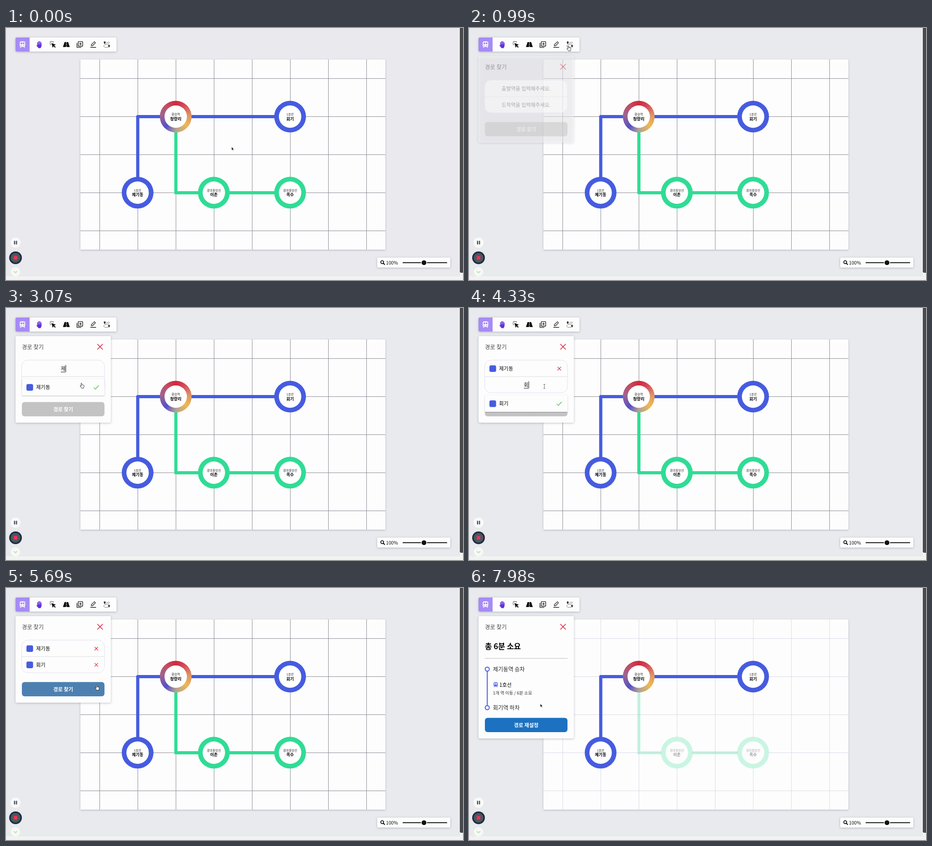
Write an HTML page with a canvas that moves like this. It is 1007 px wide and 556 px high and loops after 8000 ms.

```html
<!DOCTYPE html>
<html lang="ko">
<head>
<meta charset="utf-8">
<style>
  html, body { margin: 0; width: 100%; height: 100%; overflow: hidden; background: #e8eaed; }
  canvas { display: block; width: 1007px; height: 556px; }
</style>
</head>
<body>
<canvas id="stage" width="1007" height="556"></canvas>
<script>
const ctx = document.getElementById('stage').getContext('2d');
const LOOP = 8000;
const FONT = '"Noto Sans CJK KR", "Noto Sans CJK JP", "Noto Sans CJK", sans-serif';
const BLUE = '#465cdf', GREEN = '#30dc95', RED = '#dc2540', PAPER = '#fdfdfd';

// Moments at which the interface changes
const T = {
  settle: 30, panel: 990, type1: 2100, list1: 2330, pick1: 3400,
  type2: 4230, list2: 4300, pick2: 5330, result: 6130, dim: 6230
};

// time, x, y, shape used until the next key
const pointer = [
  [0, 497, 262, 'arrow'], [180, 497, 262, 'grab'], [330, 342, 155, 'grab'],
  [480, 268, 90, 'arrow'], [650, 228, 52, 'hand'], [830, 219, 39, 'hand'],
  [1170, 219, 39, 'hand'], [1270, 180, 82, 'arrow'], [1400, 128, 132, 'beam'],
  [1520, 124, 124, 'beam'], [2880, 124, 124, 'beam'], [3060, 165, 165, 'hand'],
  [3300, 198, 172, 'hand'], [3540, 196, 174, 'hand'], [3680, 196, 174, 'beam'],
  [3830, 166, 173, 'beam'], [4840, 166, 173, 'beam'], [4960, 184, 192, 'hand'],
  [5180, 199, 208, 'hand'], [5400, 199, 208, 'hand'], [5630, 200, 214, 'hand'],
  [5690, 200, 214, 'hand'], [5900, 158, 214, 'hand'], [7760, 158, 214, 'arrow'],
  [7980, 157, 255, 'arrow']
];

function line(points, color, width = 1, cap = 'butt') {
  ctx.beginPath();
  points.forEach(([x, y], i) => i ? ctx.lineTo(x, y) : ctx.moveTo(x, y));
  ctx.strokeStyle = color;
  ctx.lineWidth = width;
  ctx.lineCap = cap;
  ctx.lineJoin = 'round';
  ctx.stroke();
}

function poly(points, fill) {
  ctx.beginPath();
  points.forEach(([x, y]) => ctx.lineTo(x, y));
  ctx.closePath();
  ctx.fillStyle = fill;
  ctx.fill();
}

function box(x, y, w, h, r, fill, stroke, width = 1) {
  ctx.beginPath();
  ctx.roundRect(x, y, w, h, r);
  if (fill) { ctx.fillStyle = fill; ctx.fill(); }
  if (stroke) { ctx.strokeStyle = stroke; ctx.lineWidth = width; ctx.stroke(); }
}

function disc(x, y, r, fill, stroke, width = 1) {
  ctx.beginPath();
  ctx.arc(x, y, r, 0, Math.PI * 2);
  if (fill) { ctx.fillStyle = fill; ctx.fill(); }
  if (stroke) { ctx.strokeStyle = stroke; ctx.lineWidth = width; ctx.stroke(); }
}

function card(x, y, w, h, r, blur = 5) {
  ctx.save();
  ctx.shadowColor = 'rgba(60,60,90,.32)';
  ctx.shadowBlur = blur;
  ctx.shadowOffsetY = 1;
  box(x, y, w, h, r, PAPER);
  ctx.restore();
}

// y is the visual middle of the glyphs
function text(str, x, y, size, { weight = 400, color = '#111', align = 'left' } = {}) {
  ctx.font = `${weight} ${size}px ${FONT}`;
  ctx.textAlign = align;
  ctx.fillStyle = color;
  ctx.fillText(str, x, y + size * 0.38);
  return ctx.measureText(str).width;
}

function cross(x, y, r, width) {
  line([[x - r, y - r], [x + r, y + r]], RED, width);
  line([[x - r, y + r], [x + r, y - r]], RED, width);
}

function train(x, y, s, color, hole) {
  ctx.save();
  ctx.translate(x, y);
  ctx.scale(s, s);
  box(-6, -7, 12, 12, 3, color);
  box(-4.3, -4.8, 3.7, 4, 0.5, hole);
  box(0.6, -4.8, 3.7, 4, 0.5, hole);
  disc(-3, 2.2, 1.1, hole);
  disc(3, 2.2, 1.1, hole);
  line([[-3, 5], [-5, 7]], color, 1.4);
  line([[3, 5], [5, 7]], color, 1.4);
  ctx.restore();
}

function toolbar() {
  card(21, 21, 222.5, 31, 3);
  box(21, 21, 31, 31, [3, 0, 0, 3], '#a78bf5');
  train(36.3, 36.5, 1, '#fff', '#a78bf5');

  const violet = '#6433d8', ink = '#111';
  [[69.8, 32], [72.3, 30], [74.8, 30.3], [77.3, 32.5]].forEach(([x, y]) =>
    line([[x, y], [x, 39]], violet, 1.9, 'round'));
  poly([[69, 36], [78.3, 36], [78, 41], [76, 44.5], [72, 44.5], [70, 42.5], [67, 38.6], [68, 37.5], [69, 38.5]], violet);

  poly([[100, 33], [110, 37], [106, 38.6], [109.5, 42], [108, 43.6], [104.6, 40.2], [103, 44]], ink);
  [[[96, 33.5], [98, 33.5]], [[97.2, 29.8], [98.8, 31.2]], [[101, 28.8], [101, 31]],
   [[104.8, 29.8], [103.3, 31.2]], [[97.2, 37.4], [98.8, 35.8]]].forEach(p => line(p, ink, 1.2));

  poly([[129, 31], [137, 31], [140.5, 42], [125.5, 42]], ink);
  line([[133, 31.5], [133, 34]], PAPER, 1.2);
  line([[133, 35.6], [133, 38]], PAPER, 1.2);
  line([[133, 39.6], [133, 42]], PAPER, 1.2);

  box(159.2, 30.2, 9.8, 9.8, 0.5, null, ink, 1.3);
  line([[156.4, 33], [156.4, 42.8], [166, 42.8]], ink, 1.3);
  line([[164.1, 32.4], [164.1, 37.8]], ink, 1.3);
  line([[161.4, 35.1], [166.8, 35.1]], ink, 1.3);

  ctx.beginPath();
  [[188, 39.5], [188, 37], [194.8, 30.2], [197.2, 32.6], [190.4, 39.5]].forEach(p => ctx.lineTo(...p));
  ctx.closePath();
  ctx.strokeStyle = ink;
  ctx.lineWidth = 1.2;
  ctx.stroke();
  line([[186, 42.7], [198.5, 42.7]], ink, 1.4);

  [[217.5, 31.6], [227, 39]].forEach(([x, y]) => {
    disc(x, y, 2, ink);
    poly([[x - 1.9, y + 0.6], [x + 1.9, y + 0.6], [x, y + 4.2]], ink);
    disc(x, y, 0.7, PAPER);
  });
  ctx.beginPath();
  ctx.moveTo(220, 34.5);
  ctx.bezierCurveTo(229, 27, 231, 34, 222, 36);
  ctx.bezierCurveTo(211, 38, 214, 44, 225, 42.5);
  ctx.strokeStyle = '#777';
  ctx.lineWidth = 1;
  ctx.stroke();
}

function station(x, y, kind, name, color) {
  disc(x, y, 35, color);
  disc(x, y, 24.7, '#fff');
  text(kind, x, y - 5.3, 6.7, { align: 'center', color: '#222' });
  text(name, x, y + 4.6, 9, { align: 'center', weight: 700, color: '#000' });
}

function transferRing(x, y) {
  const g = ctx.createConicGradient(-Math.PI / 2, x, y);
  [[0, '#d2283a'], [0.1, '#d4485a'], [0.23, '#dd9468'], [0.36, '#eeb952'], [0.5, '#b3a096'],
   [0.62, '#5650c8'], [0.77, '#a0648f'], [0.9, '#c44a60'], [1, '#d2283a']].forEach(s => g.addColorStop(...s));
  return g;
}

function board(dim) {
  card(164, 69.5, 672, 419.5, 0, 4);
  const grid = dim ? '#d9d9e8' : '#8b8b95';
  for (let x = 206.5; x < 836; x += 84) line([[x, 69.5], [x, 489]], grid);
  for (let y = 111.5; y < 489; y += 84) line([[164, y], [836, y]], grid);

  ctx.save();
  if (dim) {
    ctx.globalAlpha = 0.25;
    // Keep the overlapping shapes from showing through one another
    line([[374.3, 230], [374.3, 363.5], [424, 363.5]], GREEN, 7);
    line([[492, 363.5], [592, 363.5]], GREEN, 7);
    [[458, '이촌'], [626, '옥수']].forEach(([x, name]) => {
      ctx.globalAlpha = 1;
      disc(x, 363.3, 34, PAPER);
      ctx.globalAlpha = 0.25;
      disc(x, 363.3, 29.85, null, GREEN, 10.3);
      ctx.globalAlpha = 0.4;
      text('경의중앙선', x, 358, 6.7, { align: 'center', color: '#222' });
      text(name, x, 367.9, 9, { align: 'center', weight: 700, color: '#000' });
    });
  } else {
    line([[374.3, 195.5], [374.3, 363.5], [626, 363.5]], GREEN, 7);
    station(458, 363.3, '경의중앙선', '이촌', GREEN);
    station(626, 363.3, '경의중앙선', '옥수', GREEN);
  }
  ctx.restore();

  line([[290.3, 363], [290.3, 195.5], [626, 195.5]], BLUE, 7);
  station(290, 363.3, '1호선', '제기동', BLUE);
  station(374, 195.5, '환승역', '청량리', transferRing(374, 195.5));
  station(626, 195.5, '1호선', '회기', BLUE);
}

function zoomBar() {
  card(818, 506.5, 161, 22, 2);
  disc(829, 516.6, 3.3, null, '#111', 1.7);
  line([[831.4, 519], [834.2, 521.8]], '#111', 2, 'round');
  text('100%', 837.3, 518.2, 10.2);
  line([[874, 517.8], [972, 517.8]], '#111', 2);
  disc(921, 517.8, 6.8, PAPER);
  disc(921, 517.8, 5.3, '#111');
}

function recorder(t) {
  disc(21, 473.5, 11.3, '#f8f9f8');
  box(17.6, 469.5, 2.6, 8, 0.4, '#4a5560');
  box(21.8, 469.5, 2.6, 8, 0.4, '#4a5560');
  disc(21, 507, 14, '#222d3b');
  disc(21, 507, 10.6, '#4b5765');
  if (t < T.settle) disc(21, 507, 4.6, '#e8354f');
  else box(17, 503, 8, 8, 1, '#e8354f');
  disc(21, 538, 10.3, '#f6f9f4');
  line([[17.3, 536.6], [21, 540], [24.7, 536.6]], '#9fc9a0', 1.2);
}

function fieldChip(name, y) {
  box(45, y - 7.3, 14.7, 14.7, 3.5, BLUE);
  text(name, 66.3, y, 11.2, { weight: 500, color: '#000' });
}

function typed(str, y) {
  const w = text(str, 126, y, 11.2, { align: 'center' });
  line([[126 - w / 2, y + 7.5], [126 + w / 2, y + 7.5]], '#111');
  line([[126 + w / 2 + 0.6, y - 8], [126 + w / 2 + 0.6, y + 7.5]], '#111');
}

function field(y, hint, name, draft, picked) {
  if (picked) {
    fieldChip(name, y);
    cross(199, y, 3.8, 1.2);
  } else if (draft) typed(draft, y);
  else text(hint, 126, y, 11.2, { align: 'center', color: '#666' });
}

function suggestion(y, name) {
  card(35, y - 18, 182, 36, 1, 3);
  fieldChip(name, y);
  line([[193.5, y + 0.5], [197, y + 4], [204.3, y - 4]], '#55c84e', 1.5);
}

function button(y, label, color) {
  box(35, y, 182, 31.5, 6, color);
  text(label, 126, y + 16, 11.2, { align: 'center', weight: 700, color: '#fff' });
}

function draft(t, start, stages, step) {
  return t < start ? '' : stages[Math.min(stages.length - 1, Math.floor((t - start) / step))];
}

function panelHead(height) {
  card(21, 62, 210, height, 3);
  text('경로 찾기', 35, 86, 12.3, { color: '#444' });
  cross(207.3, 85.5, 6, 1.7);
}

function searchPanel(t) {
  ctx.save();
  if (t < T.panel + 40) ctx.globalAlpha = 0.5;
  panelHead(191);
  box(34.5, 115, 182.5, 72, 14, PAPER, '#e0e0ef');
  line([[35, 151.5], [217, 151.5]], '#dedee6');
  field(133.7, '출발역을 입력해주세요.', '제기동', draft(t, T.type1, ['ㅈ', '저', '제'], 110), t >= T.pick1);
  field(169.5, '도착역을 입력해주세요.', '회기', draft(t, T.type2, ['ㅎ', '호', '회'], 35), t >= T.pick2);

  const k = Math.max(0, Math.min(1, (t - T.pick2) / 200));
  const mix = (a, b) => Math.round(a + (b - a) * k);
  button(207.5, '경로 찾기', `rgb(${mix(195, 77)},${mix(195, 128)},${mix(195, 177)})`);

  if (t >= T.list1 && t < T.pick1) suggestion(175, '제기동');
  if (t >= T.list2 && t < T.pick2) suggestion(211, '회기');
  ctx.restore();
}

function resultPanel() {
  panelHead(270);
  text('총 6분 소요', 35, 129, 16.8, { weight: 700, color: '#000' });
  line([[35, 155.3], [217, 155.3]], '#c6c6c9', 1.2);
  line([[40.2, 179], [40.2, 264]], BLUE, 2);
  [[179, '제기동역 승차'], [264, '회기역 하차']].forEach(([y, label]) => {
    disc(40.2, y, 4.5, '#fff', BLUE, 2);
    text(label, 52.8, y, 12.2, { color: '#222' });
  });
  train(58.8, 213.5, 0.75, BLUE, '#fff');
  text('1호선', 67, 213.5, 11.2, { weight: 500, color: '#000' });
  text('1개 역 이동 / 6분 소요', 52.8, 231, 9.5, { weight: 500, color: '#333' });
  button(286.5, '경로 재설정', '#1c71c0');
}

function outlined(points, fill, stroke) {
  poly(points, fill);
  ctx.lineJoin = 'round';
  ctx.strokeStyle = stroke;
  ctx.lineWidth = 0.9;
  ctx.stroke();
}

const shapes = {
  arrow() {
    outlined([[0, 0], [0, 8], [1.8, 6.5], [3, 9.2], [4.4, 8.6], [3.2, 6], [5.7, 6]], '#111', '#fff');
  },
  hand() {
    outlined([[-1.2, 1], [-0.3, 0.2], [0.6, 1], [1, 4.2], [3, 4.4], [5, 5.2], [5.6, 6.2], [5, 9], [4.4, 11.6],
      [0, 11.6], [-1.2, 9.5], [-3.4, 6.8], [-2.6, 6], [-0.8, 7.2]], '#fff', '#222');
  },
  grab() {
    outlined([[-4, -3], [-2, -4.2], [0, -4.4], [2, -4], [4, -2.8], [4.4, 0], [3, 4], [-2, 4], [-4.6, 0.8], [-3.6, -0.4]],
      '#fff', '#222');
    [-1.6, 0.5, 2.5].forEach(x => line([[x, -2.8], [x, -0.8]], '#444', 0.7));
  },
  beam() {
    line([[-2, -5], [0, -4.2], [2, -5]], '#555', 0.9);
    line([[-2, 5], [0, 4.2], [2, 5]], '#555', 0.9);
    line([[0, -4.2], [0, 4.2]], '#555', 0.9);
  }
};

function cursor(t) {
  let i = pointer.length - 1;
  while (pointer[i][0] > t) i--;
  const [t0, x0, y0, shape] = pointer[i];
  const [t1, x1, y1] = pointer[i + 1] || [t0 + 1, x0, y0];
  const k = (t - t0) / (t1 - t0);
  const still = x0 === x1 && y0 === y1;
  // A resting pointer keeps the look it had on arrival
  const look = i && (t === t0 || still) ? pointer[i - 1][3] : shape;
  ctx.save();
  ctx.translate(x0 + (x1 - x0) * k, y0 + (y1 - y0) * k);
  shapes[i === pointer.length - 1 ? shape : t0 === 5900 ? 'hand' : still ? look : shape]();
  ctx.restore();
}

function draw(t) {
  ctx.fillStyle = t < T.settle ? '#e9e9ee' : '#e8eaed';
  ctx.fillRect(0, 0, 1007, 556);
  ctx.fillStyle = '#f2f3f1';
  ctx.fillRect(0, 548, 1007, 8);
  ctx.fillRect(1000, 536, 7, 20);
  box(1000, -4, 9, 544, 3, '#48494b');

  board(t >= T.dim);
  toolbar();
  if (t >= T.result) resultPanel();
  else if (t >= T.panel) searchPanel(t);
  zoomBar();
  recorder(t);
  cursor(t);
}

const begin = performance.now();
function tick() {
  draw((performance.now() - begin) % LOOP);
  requestAnimationFrame(tick);
}
tick();
</script>
</body>
</html>
```
